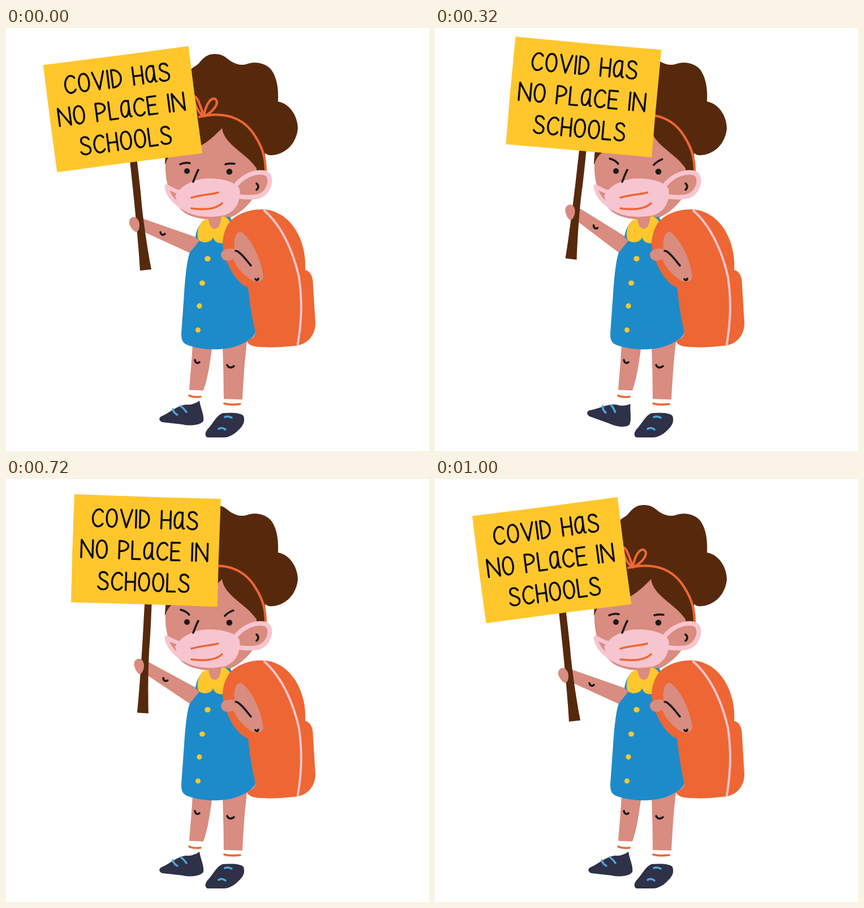
Animation of 748 by 748 pixels, one loop 1040 ms. Source, as an HTML page:

```html
<!DOCTYPE html>
<html lang="en">
<head>
<meta charset="utf-8">
<title>Girl with a placard</title>
<style>
  html, body { margin: 0; width: 100%; height: 100%; overflow: hidden; background: #fff; }
  svg { display: block; width: 100vw; height: 100vh; }
  .skin { fill: #d98c80; }
  .hair { fill: #56290d; }
  .orange { fill: #ee6633; }
  .blue { fill: #1d8bc9; }
  .yellow { fill: #ffc72c; }
  .pink { fill: #f7c5d0; }
  .shoe { fill: #2e3147; }
  .line { fill: none; stroke: #1c1a1c; stroke-width: 3.6; stroke-linecap: round; stroke-linejoin: round; }
  .trim { stroke: #ee6633; }
  .strap { stroke: #f7c5d0; }
  .lace { stroke: #4da6dd; }
</style>
</head>
<body>
<svg viewBox="0 0 748 748" role="img" aria-label="COVID HAS NO PLACE IN SCHOOLS">
  <g id="legs">
    <path class="skin" d="M330 555L365 560C361 590 357 620 349 641L324 640C326 612 329 585 330 555Z"/>
    <path class="skin" d="M383 560L427 548C422 585 420 620 418 657L385 656C385 625 384 590 383 560Z"/>
    <path class="line" d="M334 587C335 592 338 594 342 591M391 596C394 602 399 601 403 598"/>
    <path class="line trim" d="M324 650C330 653 337 653 344 652M386 664C395 667 405 666 414 665"/>
  </g>
  <g id="tapFoot">
    <path class="shoe" d="M342 659C344 672 351 685 349 695C343 703 325 704 312 701L276 697C270 694 270 690 274 687C290 680 304 667 318 666C330 667 338 662 342 659Z"/>
    <path class="line lace" d="M295 674C296 679 299 682 303 684M309 669C313 671 316 675 319 679"/>
  </g>
  <path class="shoe" d="M383 681C398 680 415 680 420 686C423 695 420 702 414 708C405 718 395 724 385 724L356 724C351 721 352 715 356 710C366 700 372 685 383 681Z"/>
  <path class="line lace" d="M387 688C391 686 395 687 399 689M376 709C380 706 384 707 388 710"/>

  <g id="head">
    <path class="hair" d="M322 80C328 68 338 68 343 60C352 49 360 46 368 46C384 46 388 52 398 59C408 65 418 67 428 63C445 58 462 64 470 75C480 90 482 110 481 130C503 134 516 157 516 178C514 202 496 224 468 225Q462 225 458 221L461 266L440 262L300 262L281 240C284 190 296 130 322 80Z"/>
    <path class="skin" d="M282 240C286 228 292 222 300 218C335 222 362 198 382 177C386 207 424 220 443 248L444 290C434 308 419 325 397 335C380 341 340 341 318 328C298 316 280 280 282 240Z"/>
    <path class="line trim" d="M342 157C395 145 425 165 441 192C456 215 460 235 459 264M350 156C352 140 360 123 369 125C380 131 366 149 350 156C338 150 332 130 333 121C339 121 344 140 350 156" style="stroke-width:4.2"/>
    <path class="skin" d="M407 276C420 260 440 252 458 256C472 260 468 278 460 289C452 300 440 301 412 298Z"/>
    <path class="line strap" d="M408 276C422 260 442 253 457 256C470 259 468 276 461 287C453 300 436 301 412 298" style="stroke-width:8"/>
    <path class="line" d="M443 275C447 278 447 283 443 286"/>
    <path class="line strap" d="M306 290C297 288 291 284 284 280C285 295 298 309 314 319" style="stroke-width:7"/>
    <path class="pink" d="M299 297C310 275 340 265 360 266C388 266 410 275 413 285C416 305 407 324 387 331C352 339 314 330 304 312Z"/>
    <path class="line trim" d="M328 300C344 295 360 295 375 291M328 319C350 322 370 321 382 310"/>
    <path class="line" d="M340 251C336 258 334 265 331 272"/>
    <path class="line" id="brows"/>
    <g id="openEyes" fill="#1c1a1c">
      <circle cx="320" cy="253" r="5"/>
      <circle cx="395" cy="254" r="5.3"/>
    </g>
    <path class="line" id="shutEyes" d="M311 254C314 259 322 260 327 255M388 254C392 259 399 259 403 254"/>
  </g>

  <g id="arm">
    <path class="skin" d="M236 335L345 373L330 400L236 357Z"/>
    <path class="line" d="M273 361C274 366 278 367 281 364"/>
    <path class="hair" d="M219 234L231.500 233Q236 270 239 300C241 330 250 390 257 427L237 429Q234 380 226 300Z"/>
    <path class="skin" d="M227 334C220 334 217 340 218 346C221 354 226 360 231 361C236 358 237 349 235 342C233 338 231 335 227 334Z"/>
    <g transform="translate(206.5 143.5) rotate(-7.4)">
      <path class="yellow" d="M-129.500-95.500L0-95 129.500-95.500 129 20 129.500 95.500-10 95-129.500 95.500-130 10Z"/>
      <path class="line" id="slogan" style="stroke:#0c0a08;stroke-width:3.4"/>
    </g>
  </g>

  <path class="blue" d="M348 341C340 350 336 360 335 370L342 376 325 397C320 410 317 440 315 470L310 540C310 552 312 557 322 561C345 569 370 570 395 566C418 561 441 548 441 537L428 455 420 380 396 334 382 334Z"/>
  <path class="yellow" d="M349 340C338 350 336 370 342 376C352 382 364 378 366 370C369 378 375 382 384 380C384 365 390 355 398 346C394 336 386 331 380 334L358 337Z"/>
  <path class="skin" d="M357 335L381 333C379 348 376 355 369 355C362 355 360 348 357 335Z"/>
  <g class="yellow">
    <ellipse cx="356.5" cy="408" rx="5.2" ry="4.8"/>
    <ellipse cx="347" cy="451" rx="5" ry="4.5"/>
    <ellipse cx="342" cy="491.5" rx="4.5" ry="4.7"/>
    <ellipse cx="339.5" cy="534" rx="4.5" ry="4.5"/>
  </g>

  <g id="bag">
    <path class="orange" d="M398 340C420 319 458 317 475 325C510 338 532 382 529 428C539 430 543 440 543 455L547 520C548 546 530 561 510 562C482 565 452 566 436 562C430 560 427 557 426 553C436 549 441 544 441 537C434 510 431 485 428 459C404 450 384 408 383 380C384 362 390 349 398 340Z"/>
    <path class="line strap" d="M457 323C490 352 509 400 518 440C524 480 523 520 516 559" style="stroke-width:4"/>
    <path class="skin" d="M404 388C402 371 408 358 417 361C437 376 453 415 455 440C454 450 440 451 431 444C418 434 408 424 402 409C392 414 381 412 380 401C381 391 393 388 404 391Z"/>
    <path class="line" d="M406 394C413 394 424 409 433 420M441 444C443 447 446 446 446 443"/>
  </g>
</svg>
<script>
const STEP = 40, STEPS = 26;
const el = id => document.getElementById(id);

// Hand lettering: centre-line strokes, 31 units tall: [width, path]
const GLYPHS = {
  ' ': [8, ''],
  C: [18, 'M18 5C15 0 9-1 5 4C-1 11-1 22 4 28C8 33 15 31 18 26'],
  O: [18, 'M9 0C-3 0-3 31 9 31S21 0 9 0Z'],
  V: [20, 'M0 0L10 31 20 0'],
  I: [0, 'M0 0V31'],
  D: [16, 'M0 0V31C21 31 21 0 0 0Z'],
  H: [16, 'M0 0V31M16 0V31M0 16H16'],
  a: [16, 'M14 4C8-2 0 4 0 18C0 34 11 34 14 15M14 2V22C14 28 15 31 17 30'],
  S: [17, 'M16 5C12-2 2-1 2 7C2 16 17 14 17 23C17 33 4 33 0 26'],
  N: [20, 'M0 31V0L20 31V0'],
  P: [16, 'M0 31V0C20-2 22 18 0 18'],
  L: [14, 'M0 0V31H14'],
  E: [15, 'M15 0H0V31H15M0 15H13']
};
const GAP = 7;

function writeLine(text, centerX, centerY) {
  const glyphs = [...text].map(c => GLYPHS[c]);
  const width = glyphs.reduce((sum, [w]) => sum + w + GAP, -GAP);
  let x = centerX - width / 2;
  for (const [w, d] of glyphs) {
    const letter = el('slogan').cloneNode();
    letter.removeAttribute('id');
    letter.setAttribute('d', d);
    letter.setAttribute('transform', `translate(${x} ${centerY - 15.5})`);
    el('slogan').before(letter);
    x += w + GAP;
  }
}
writeLine('COVID HaS', -3.5, -55.5);
writeLine('NO PLaCE IN', -2.5, 0);
writeLine('SCHOOLS', -2.5, 55.5);

// Smooth curve through [step, value] keys, at rest at both ends
function curve(keys, step) {
  const last = keys.length - 1;
  if (step >= keys[last][0]) return keys[last][1];
  const i = keys.findIndex((key, n) => n < last && step < keys[n + 1][0]);
  const slope = n => n === 0 || n === last ? 0 :
    (keys[n + 1][1] - keys[n - 1][1]) / (keys[n + 1][0] - keys[n - 1][0]);
  const [t0, a] = keys[i], [t1, b] = keys[i + 1];
  const span = t1 - t0, u = (step - t0) / span, v = 1 - u;
  return a * v * v * (1 + 2 * u) + b * u * u * (3 - 2 * u) +
    span * u * v * (slope(i) * v - slope(i + 1) * u);
}

const SWING = [[0, 0], [6, 9], [10, 15.8], [12, 16.9], [14, 15.5], [18, 9.2], [20, 5.6], [25, 0]];
const TAP = [[0, 0], [6, 15.8], [10, 8], [13, 0]];
const FROWN = [[0, 0], [5, 1], [20, 1], [24, 0]];
const CALM_BROWS = [308, 241, 316, 237, 325, 239, 388, 241, 395, 239, 404, 240];
const CROSS_BROWS = [309, 232, 319, 234, 324, 240, 387, 242, 393, 236, 402, 233];

function browPath(frown) {
  const p = CALM_BROWS.map((c, i) => c + (CROSS_BROWS[i] - c) * frown);
  return `M${p.slice(0, 2)}Q${p.slice(2, 6)}M${p.slice(6, 8)}Q${p.slice(8)}`;
}

function draw(ms) {
  const step = Math.floor(ms / STEP) % STEPS;
  const blink = step >= 13 && step <= 15;
  el('arm').setAttribute('transform', `rotate(${curve(SWING, step)} 332.4 389)`);
  el('tapFoot').setAttribute('transform', `rotate(${curve(TAP, step)} 319 677)`);
  el('brows').setAttribute('d', browPath(curve(FROWN, step)));
  el('openEyes').style.display = blink ? 'none' : '';
  el('shutEyes').style.display = blink ? '' : 'none';
}

const start = performance.now();
function tick(now) {
  draw(Math.max(0, now - start));
  requestAnimationFrame(tick);
}
draw(0);
requestAnimationFrame(tick);
</script>
</body>
</html>
```
